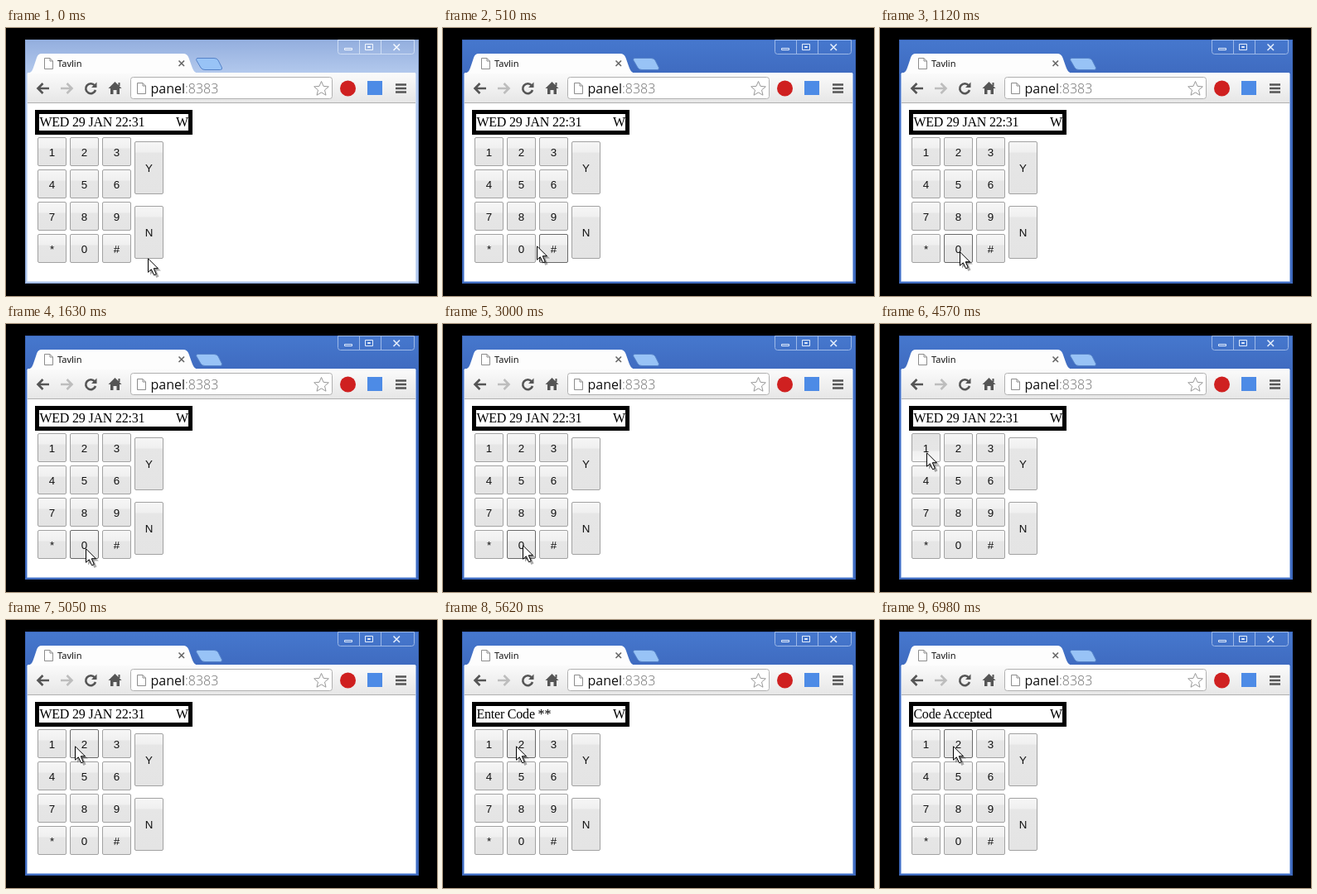
Recreate the animation shown at these times as an HTML page. Size 520 by 324 pixels, loop 8 s.

```html
<!DOCTYPE html>
<html lang="en">
<head>
<meta charset="utf-8">
<title>Alarm keypad</title>
<style>
html, body { margin: 0; width: 100%; height: 100%; overflow: hidden; background: #000; }
#stage {
  --top: #4678ce; --low: #3f6bc0; --edge: #3c66b8; --rim: #9db9e8; --glyph: #e3edfb;
  position: relative; width: 520px; height: 324px; overflow: hidden; background: #000;
}
#stage.idle { --top: #93aede; --low: #b3c9ed; --edge: #8ba5d4; --rim: #cfdef5; --glyph: #f4f8fe; }
#stage > * { position: absolute; }
#browser { left: 0; top: 0; }
.top { stop-color: var(--top); }
.low { stop-color: var(--low); }
.rim { fill: none; stroke: var(--rim); }
.edge { fill: none; stroke: var(--edge); }
.glyph { fill: none; stroke: var(--glyph); }
.ui { font: 11px "Noto Sans", "Open Sans", sans-serif; }
.url { font: 16px "Open Sans", "Noto Sans", sans-serif; }
#lcd {
  left: 35px; top: 99px; width: 180px; height: 20px;
  border: 5px solid #000; background: #fff;
  font: 16px/20px "Liberation Serif", "Times New Roman", serif;
  letter-spacing: -.2px; white-space: pre;
}
#lcd span { position: absolute; top: 0; }
#msg { left: .4px; }
#mode { right: 0; }
.key {
  box-sizing: border-box; width: 35px; height: 35px;
  border: 1px solid #a2a2a2; border-radius: 2px;
  background: linear-gradient(#f6f6f6, #f0f0f0 12px, #e6e6e6 13px, #e4e4e4);
  color: #111; text-align: center;
  font: 13.333px/35px "Liberation Sans", Arial, sans-serif;
}
.tall { height: 64px; line-height: 63px; }
.hover { border-color: #6a6a6a; }
.down {
  border-color: #a2a2a2;
  background: linear-gradient(to top, #f6f6f6, #f0f0f0 12px, #e6e6e6 13px, #e4e4e4);
}
#cursor { left: 0; top: 0; overflow: visible; }
</style>
</head>
<body>
<div id="stage">
  <svg id="browser" width="520" height="324" viewBox="0 0 520 324">
    <defs>
      <linearGradient id="bar" x2="0" y2="1">
        <stop offset="0" class="top"/>
        <stop offset="1" class="low"/>
      </linearGradient>
      <linearGradient id="tools" x2="0" y2="1">
        <stop offset="0" stop-color="#fbfbfb"/>
        <stop offset="1" stop-color="#e6e6e6"/>
      </linearGradient>
      <path id="page" d="M.5 .5H7L10.5 4V13.5H.5ZM7 .5V4H10.5" fill="#fff" stroke="#8d8d8d"/>
    </defs>

    <!-- window frame -->
    <rect x="23" y="14" width="475" height="295" fill="var(--low)"/>
    <rect x="23" y="14" width="475" height="41" fill="url(#bar)"/>
    <path class="edge" d="M23.5 14.5H497.5V308.5H23.5Z"/>
    <path class="rim" d="M25.5 55V306.5H494.5V55"/>

    <!-- caption buttons -->
    <path class="rim" d="M400.5 14.5V28.5Q400.5 31.5 403.5 31.5H489.5Q492.5 31.5 492.5 28.5V14.5ZM426.5 15V31M452.5 15V31"/>
    <g class="glyph">
      <path d="M408.5 24.5H417.5V26.5H408.5Z"/>
      <path d="M433.500 19.500H442.500V26.500H433.500ZM436.500 22.500H439.500V23.500H436.500Z"/>
      <path d="M467.500 19.500L475 27M475 19.500L467.500 27" stroke-width="1.6"/>
    </g>

    <!-- tabs and toolbar -->
    <path d="M230.500 36.500H251Q254.500 36.500 256 39L260.500 48Q261 50.500 258.500 50.500H240Q236.500 50.500 235 48L229.500 38.500Z" fill="#98c3f6" stroke="#5582c8"/>
    <rect x="26" y="54" width="468" height="37" fill="url(#tools)"/>
    <path d="M26 55C31 54 32 51 34 45L37 36Q38.500 31 43 31H214Q218.500 31 220.500 36L224 46C226 52 228 54 232 55Z" fill="#fdfdfd"/>
    <path d="M26 90.500H494" stroke="#b0b0b0"/>
    <rect x="26" y="91" width="468" height="215" fill="#fff"/>
    <use href="#page" x="46" y="36"/>
    <text class="ui" x="62" y="47" fill="#111">Tavlin</text>
    <path d="M208.500 39.500L215 46M215 39.500L208.500 46" stroke="#666" stroke-width="1.6"/>

    <!-- navigation -->
    <g fill="none" stroke-width="2.6">
      <path d="M38.500 73H52M44.500 67L38.500 73L44.500 79" stroke="#555"/>
      <path d="M66 73H79.500M73.500 67L79.500 73L73.500 79" stroke="#bdbdbd"/>
      <path d="M107 69.500A6 6 0 1 0 108 75" stroke="#555"/>
    </g>
    <path d="M109.500 65.500V72H103Z" fill="#555"/>
    <path d="M131.500 65L139.500 73H137V80H133.500V75H129.500V80H126V73H123.500ZM135.500 66H137.500V70H135.500Z" fill="#555"/>
    <rect x="150.500" y="59.500" width="243" height="26" rx="3" fill="#fff" stroke="#b0b0b0"/>
    <use href="#page" x="158" y="66"/>
    <text class="url" x="174.500" y="79" fill="#111">panel<tspan fill="#707070" font-weight="300">:8383</tspan></text>
    <path d="M380.500 64.500L383 70.300L389.300 70.900L384.500 75L386 81.200L380.500 77.900L375 81.200L376.500 75L371.700 70.900L378 70.300Z" fill="#fff" stroke="#999"/>
    <circle cx="412.500" cy="73" r="9.500" fill="#cf2020"/>
    <rect x="436" y="64" width="18" height="17" fill="#4d8be6"/>
    <path d="M470 68.500H483M470 73H483M470 77.500H483" stroke="#555" stroke-width="2.500"/>
  </svg>

  <div id="lcd"><span id="msg"></span><span id="mode">W</span></div>

  <svg id="cursor" width="20" height="26">
    <path d="M3 4V20.500L7 17L10.500 24L13.500 22.500L10.500 15.500H16Z" fill="#000" opacity=".32"/>
    <path d="M.5 .8V17.300L4.300 13.800L7.600 20.800L10.300 19.500L7.300 12.700H12.400Z" fill="#fff" stroke="#000"/>
  </svg>
</div>

<script>
const LOOP = 8000, LAG = 30, FOCUS = 30;
const stage = document.getElementById('stage');
const cursor = document.getElementById('cursor');
const msg = document.getElementById('msg');

// [time, x, y] of the pointer tip
const path = [
  [0, 171, 278], [250, 171, 278], [340, 185, 274],
  [510, 113, 263], [630, 93, 259], [920, 93, 259],
  [1150, 96, 272], [1530, 96, 272], [1570, 96, 271], [1760, 96, 271],
  [1820, 96, 267], [3490, 96, 267], [3590, 95, 277], [3680, 90, 270],
  [4290, 56, 161], [4420, 56, 155], [4700, 56, 155], [5110, 88, 152]
];
const presses = [
  [1310, 1540, '0'], [2310, 2800, '0'], [4540, 4730, '1'], [5240, 5400, '2']
];
const clock = 'WED 29 JAN 22:31', ask = 'Enter Code ';
const screens = [
  [0, clock], [1980, ask + '*'], [3000, clock], [3680, ask + '*'],
  [4320, clock], [5620, ask + '**'], [6320, ask + '***'], [6980, 'Code Accepted']
];

function addKey(label, x, y, h) {
  const el = document.createElement('div');
  el.textContent = label;
  el.style.left = x + 'px';
  el.style.top = y + 'px';
  stage.insertBefore(el, cursor);
  return { label, x, y, h, el };
}

const keys = [...'123456789*0#'].map((c, i) =>
  addKey(c, 38 + i % 3 * 39, 132 + Math.floor(i / 3) * 39, 35));
keys.push(addKey('Y', 155, 137, 64), addKey('N', 155, 215, 64));

function pointerAt(t) {
  const i = path.findIndex(p => p[0] > t);
  if (i < 0) return path[path.length - 1].slice(1);
  if (i === 0) return path[0].slice(1);
  const [t0, x0, y0] = path[i - 1], [t1, x1, y1] = path[i];
  const k = (t - t0) / (t1 - t0);
  return [Math.round(x0 + (x1 - x0) * k), Math.round(y0 + (y1 - y0) * k)];
}

function draw(t) {
  stage.className = t < FOCUS ? 'idle' : '';
  const [x, y] = pointerAt(t);
  cursor.style.transform = `translate(${x}px, ${y}px)`;

  // the page notices the pointer slightly late
  const [hx, hy] = pointerAt(t - LAG);
  const press = presses.find(p => t >= p[0] && t < p[1]);
  for (const k of keys) {
    const over = hx >= k.x && hx < k.x + 35 && hy >= k.y && hy < k.y + k.h - 1;
    k.el.className = 'key' + (k.h > 35 ? ' tall' : '') + (over ? ' hover' : '') +
      (press && press[2] === k.label ? ' down' : '');
  }

  const text = screens.filter(s => s[0] <= t).pop()[1];
  if (msg.textContent !== text) msg.textContent = text;
}

const start = performance.now();
function tick() {
  draw((performance.now() - start) % LOOP);
  requestAnimationFrame(tick);
}
tick();
</script>
</body>
</html>
```
